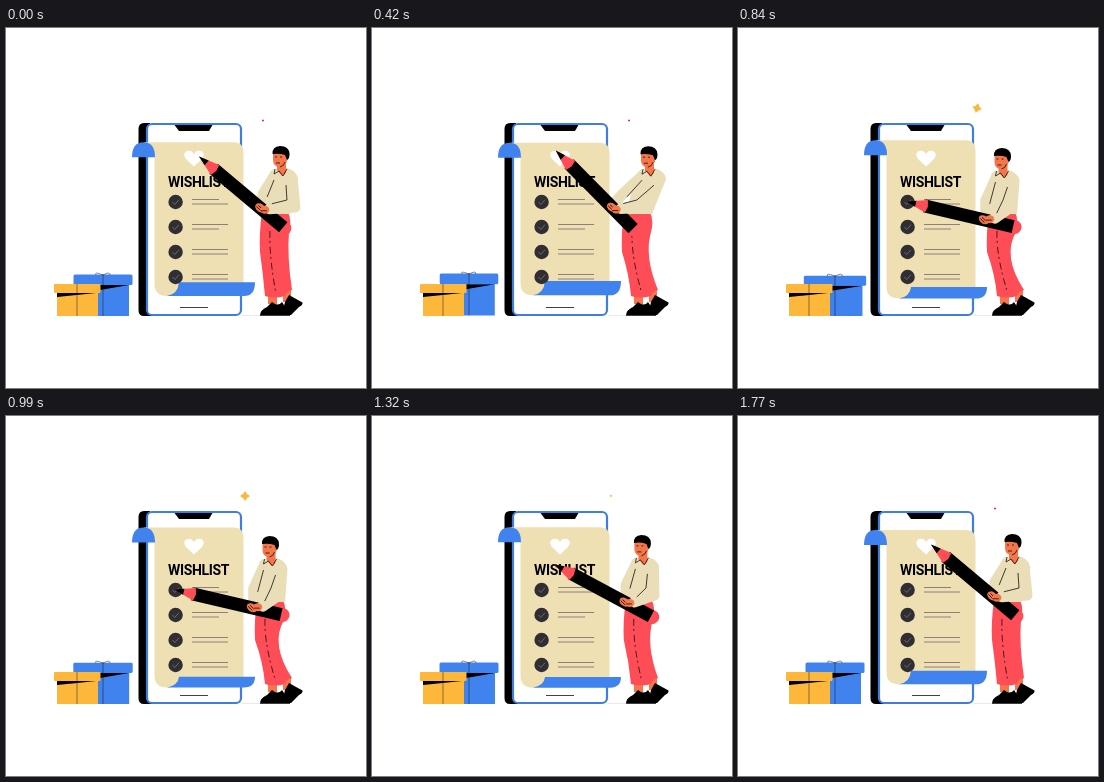
These frames come from a looping animation (360x360 px, 1.8 s). An HTML page:

```html
<!DOCTYPE html>
<html lang="en">
<head>
<meta charset="utf-8">
<title>Wishlist</title>
<style>
  html, body { margin: 0; width: 100%; height: 100%; overflow: hidden; background: #fff; }
  svg { display: block; width: 100vw; height: 100vh; }
  .blue { fill: #4083ef; }
  .paper { fill: #efe0b4; }
  .shirt { fill: #e9deb8; }
  .sleeve { fill: none; stroke: #e9deb8; stroke-width: 11; stroke-linecap: round; stroke-linejoin: round; }
  .skin { fill: #f4764a; }
  .red { fill: #ff4d57; }
  .yellow { fill: #fdb73b; }
  .thin { fill: none; stroke: #111; stroke-width: .8; }
  text { font: 700 14px Roboto, "Liberation Sans", sans-serif; letter-spacing: -.35px; }
</style>
</head>
<body>
<svg viewBox="0 0 360 360">
  <path d="M236 287.5H256" stroke="#e9e9e9"/>

  <g id="gift">
    <path class="blue" d="M71 256H123V288H71Z"/>
    <path d="M94 257H123L94 262Z"/>
    <rect class="blue" x="67.5" y="246.5" width="59" height="10.5" rx="1.5"/>
    <path class="thin" d="M97 246V288M97 247Q88 243 90 247M97 247Q104 243 104 247" stroke-opacity=".6"/>
  </g>
  <path class="yellow" d="M51 264H92V288H51Z"/>
  <path d="M51 265H90L51 269Z"/>
  <rect class="yellow" x="48" y="256" width="46.5" height="9" rx="1"/>
  <path class="thin" d="M71 256V288" stroke-opacity=".6"/>

  <path d="M144 95H138Q132.500 95 132.500 101V282Q132.500 288 138 288H146Z"/>
  <rect x="141" y="96" width="94" height="191" rx="5" fill="#fff" stroke="#3f7de0" stroke-width="2.2"/>
  <path d="M168.500 97H206.500L203 103H173Z"/>
  <path class="thin" d="M174 279.500H202"/>

  <path id="sheet" class="paper"/>
  <path id="roll" class="blue" d="M126 15Q126 0 137.500 0T149 15Z"/>
  <path id="curl" class="blue"/>
  <path fill="#fff" d="M188 138.500L180 131Q176.500 126 180 123.500Q185 121 188 126Q191 121 196 123.500Q199.500 126 196 131Z"/>
  <text x="162" y="158.800">WISHLIST</text>
  <g id="list"></g>

  <path id="spark" class="yellow" d="M0-5Q1.500-1.500 5 0Q1.500 1.500 0 5Q-1.500 1.500-5 0Q-1.500-1.500 0-5Z"/>
  <path id="dot" d="M256 92.500H258" stroke="#e8304a" stroke-width="1.500"/>

  <path class="skin" d="M262 262H271V276H262ZM277 260H285V274H277Z"/>
  <path d="M283 267L296.500 274.500Q297 277 293 279L285 287H276L279 274Z"/>
  <path d="M266 274Q272 279 276 274L284 286V287.800H254Q254 282 261 279Z"/>
  <path id="pants" class="red"/>
  <path id="seam" class="thin" stroke-dasharray="7 3 2 4"/>
  <path id="farArm" class="sleeve"/>
  <path id="torso" class="shirt"/>
  <g id="head">
    <path class="skin" d="M-3 5H6V15L2 18L-3 12Z"/>
    <path class="skin" d="M-7-6H7V3Q5 9-1 9Q-7 8-7 2Z"/>
    <path d="M-7.500-4Q-8-11.500 0-12Q9-12 9.500-4Q9.500 1 7 2L5-3Q-1-5-7.500-4Z"/>
    <path class="thin" d="M-5-1H-3M0-1H2M-4 5H0M0 9Q4 8 5 4M-5 11L-6 16L-1 13L3 18L7 11"/>
  </g>
  <g id="pencil">
    <circle class="red" cx="111.500" r="7"/>
    <path d="M19-6.500H110V6.500H19Z"/>
    <path class="red" d="M0 0L21-6.500L22.500 0L21 6.500Z"/>
    <path d="M0 0L10-3.100V3.100Z"/>
  </g>
  <path id="nearArm" class="sleeve"/>
  <path id="folds" class="thin"/>
  <g id="farHand"><ellipse class="skin" rx="5.500" ry="4"/><path class="thin" d="M-4 1L2 2M-3-1L3 0"/></g>
  <g id="nearHand"><ellipse class="skin" rx="4.500" ry="4"/><path class="thin" d="M-4 1L2 1"/></g>
</svg>
<script>
const LOOP = 1800;
const $ = id => document.getElementById(id);
const set = (id, name, value) => $(id).setAttribute(name, value);
const move = (id, x, y, more = '') => set(id, 'transform', `translate(${x} ${y}) ${more}`);

const span = (a, b, t) => Math.min(1, Math.max(0, (t - a) / (b - a)));
const ease = (a, b, t) => (1 - Math.cos(Math.PI * span(a, b, t))) / 2;
const pulse = (a, b, t) => Math.sin(Math.PI * span(a, b, t));

for (let i = 0; i < 4; i++) {
  const y = 174 + 25 * i, short = i < 2 ? 213 : 222;
  const ends = i === 1 ? [222, short] : [short, 222];
  $('list').innerHTML += `
    <circle cx="169.600" cy="${y}" r="7.200" fill="#302e32"/>
    <path d="M166.500 ${y}l2.300 2.500l4.200-4.800" fill="none" stroke="#77777c" stroke-width=".8"/>
    <path d="M186 ${y - 2.5}H${ends[0]}M186 ${y + 2}H${ends[1]}" stroke="#827476" stroke-width=".9"/>`;
}

// The sheet stretches and shrinks once per loop.
function drawSheet(t) {
  const sway = Math.cos(2 * Math.PI * (t - 1170) / LOOP);
  const top = 113 - 2 * sway, fold = 257 + 4.7 * sway, base = 269.5 + 2.5 * sway;
  set('sheet', 'd', `M138 ${top}H228Q237.500 ${top} 237.500 ${top + 11}V${fold + 2}H174
    Q173 ${base} 161 ${base}Q148.500 ${base} 148.500 ${base - 12}V${top + 12}Z`);
  set('curl', 'd', `M173 ${fold}H249Q249 ${base} 238 ${base}H161Q172 ${base - 2} 173 ${fold}Z`);
  move('roll', 0, top);
}

function drawPerson(t) {
  // The tip arcs over the heart, drops to the first bullet, then returns.
  const back = ease(1170, 1450, t);
  const raise = pulse(0, 570, t);
  const lean = ease(0, 570, t) - back;
  const drop = ease(570, 840, t) - back;

  const tipX = 193 - 11 * lean - 14 * drop;
  const tipY = 128.5 + 1.5 * lean + 43.5 * drop - 10 * raise;
  const angle = 40 + 1.5 * lean + 5.5 * raise - 28.3 * drop;
  const rad = angle * Math.PI / 180;
  const grip = d => [tipX + d * Math.cos(rad), tipY + d * Math.sin(rad)];
  const [farX, farY] = grip(80), [nearX, nearY] = grip(86);

  const hx = 274 + 5 * raise - 2 * lean - 8.5 * drop;
  const hy = 130 - 2 * raise + 2 * lean;
  const hip = 270 - 2 * raise - 3 * lean - 2 * drop;
  const lx = hx - 8, ly = hy + 14, rx = hx + 15, ry = hy + 18;
  const farElbow = [(lx + farX) / 2 - 3, (ly + farY) / 2 + 4];
  const ex = hip + 19 - 11 * lean - 4 * raise, ey = 179;
  const knee = hip + 11 - 6 * lean - 6 * drop;

  move('head', hx, hy);
  move('pencil', tipX, tipY, `rotate(${angle})`);
  move('farHand', farX, farY, 'rotate(35)');
  move('nearHand', nearX, nearY - 2);
  set('torso', 'd', `M${lx - 2} ${ly}Q${lx + 1} ${ly - 4} ${hx - 3} ${hy + 11}L${hx + 7} ${hy + 10}
    Q${rx + 2} ${ry - 5} ${rx + 3} ${ry + 3}L${hip + 14} 186H${hip - 13}Z`);
  set('farArm', 'd', `M${lx + 3} ${ly + 3}L${farElbow}L${farX + 2} ${farY - 4}`);
  set('nearArm', 'd', `M${rx - 3} ${ry + 2}L${ex} ${ey}L${nearX + 5} ${nearY - 3}`);
  set('folds', 'd', `M${rx - 9} ${ry + 9}L${ex - 8} ${ey - 7}L${nearX + 7} ${nearY - 8}
    M${lx + 2} ${ly + 8}L${farElbow[0] + 4} ${farElbow[1] + 3}`);
  set('pants', 'd', `M${hip - 14} 184H${hip + 12}Q${hip + 16} 193 ${hip + 13} 204
    Q${knee} 228 286 262Q280 263 279 268Q268 271 259 268Q257 246 ${hip - 16} 224
    Q${hip - 17} 206 ${hip - 14} 184Z`);
  set('seam', 'd', `M${hip - 6} 203Q${hip - 7} 228 270 266`);
}

function draw() {
  const t = (performance.now() - began) % LOOP;
  drawSheet(t);
  drawPerson(t);

  const hop = pulse(400, 740, t), squash = pulse(740, 1000, t);
  move('gift', 97, 288 - 3 * hop,
    `scale(${1 - .04 * hop + .06 * squash} ${1 + .04 * hop - .03 * squash}) translate(-97 -288)`);

  const size = ease(450, 760, t) - ease(1180, 1400, t);
  move('spark', 239, 80, `rotate(${14 * pulse(700, 980, t)}) scale(${size})`);
  set('dot', 'opacity', t < 450 || t > 1620 ? 1 : 0);

  requestAnimationFrame(draw);
}
const began = performance.now();
draw();
</script>
</body>
</html>
```
